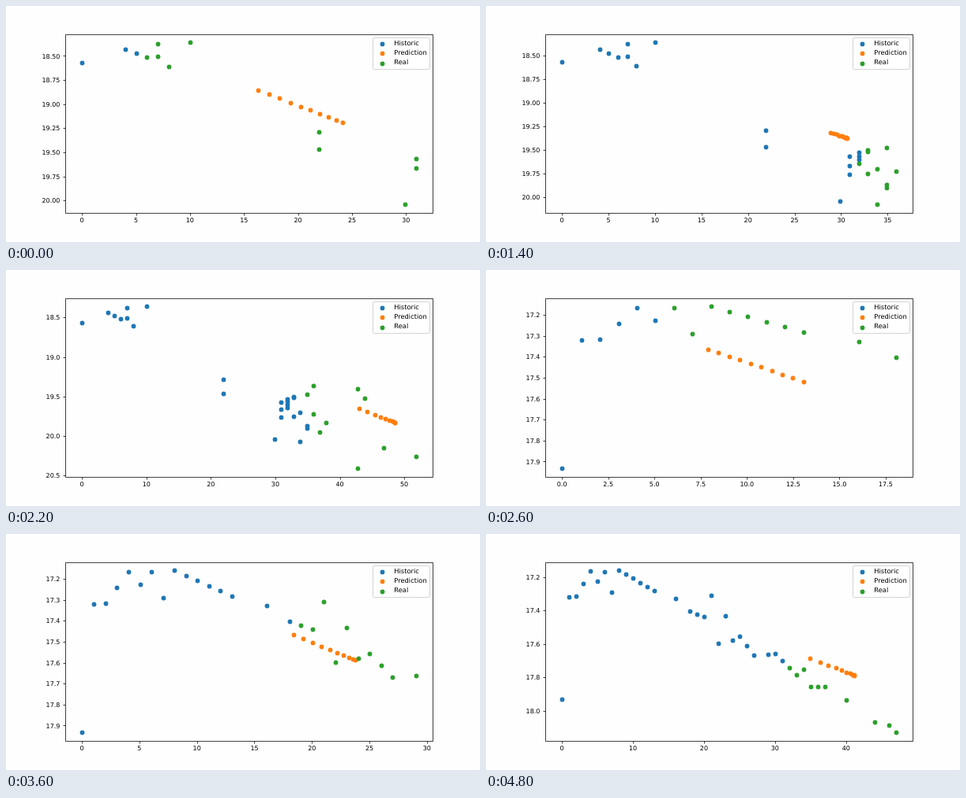
An HTML page for the animation above (5 s loop, 600x300 px).

```html
<!DOCTYPE html>
<html lang="en">
<head>
<meta charset="utf-8">
<title>Forecast scatter</title>
<style>
  html, body { margin: 0; width: 100%; height: 100%; overflow: hidden; background: #fefefe; }
  svg { display: block; width: 100%; height: 100%; }
  text { font: 8px "DejaVu Sans", sans-serif; text-rendering: geometricPrecision; }
  .legend text { font-size: 8.333px; }
</style>
</head>
<body>
<svg id="chart" viewBox="0 0 600 300"></svg>
<script>
const STEP = 200, COUNT = 25, AHEAD = 10;
const BOX = { l: 75, t: 36, r: 540, b: 262.5 };
const BLUE = '#1f77b4', ORANGE = '#ff7f0e', GREEN = '#2ca02c';

const lerp = (a, b, t) => a + (b - a) * t;
const range = (n, fn) => Array.from({ length: n }, (_, i) => fn(i));

// Key points [day, magnitude, n]: n evenly spaced observations lead up to each one
function observe(rate, keys) {
  return keys.flatMap(([day, mag, n = 1], j) => {
    const [day0, mag0] = keys[j - 1] || [day, mag];
    return range(n, q => {
      const t = (q + 1) / n, d = lerp(day0, day, t);
      return [d && d * rate + .07, lerp(mag0, mag, t)];
    });
  });
}

// Forecast keys: [step, first day, first magnitude, days covered, magnitude gained]
const phases = [{
  from: 0, known: 3, legend: 464.5,
  points: observe(.995, [
    [0, 18.57], [4, 18.435], [6, 18.515, 2], [7, 18.38], [7, 18.51], [8, 18.61], [10, 18.36],
    [22, 19.47], [22, 19.29], [30, 20.04], [31, 19.57], [31, 19.76, 2], [32, 19.53], [32, 19.64, 3],
    [33, 19.75], [33, 19.5], [33, 19.515], [34, 19.7], [34, 20.075], [35, 19.87], [35, 19.905],
    [35, 19.475], [36, 19.725], [36, 19.37], [37, 19.95], [38, 19.83], [43, 19.41], [43, 20.41],
    [44, 19.52], [47, 20.15], [52, 20.26]
  ]),
  forecasts: [
    [0, 16.29, 18.855, 7.84, .338], [3, 19.13, 18.969, 7.14, .265],
    [7, 28.86, 19.316, 1.78, .058], [11, 43, 19.652, 5.58, .179]
  ]
}, {
  from: 12, known: 4,
  points: observe(.999, [
    [0, 17.933], [1, 17.322], [2, 17.316], [4, 17.166, 2], [5, 17.228], [6, 17.168], [7, 17.292],
    [8, 17.16], [13, 17.283, 5], [16, 17.328], [18, 17.405], [20, 17.44, 2], [21, 17.312],
    [22, 17.6], [23, 17.435], [24, 17.58], [25, 17.557], [27, 17.669, 2], [29, 17.664], [30, 17.66],
    [33, 17.785, 3], [34, 17.752], [35, 17.855], [37, 17.858, 2], [40, 17.937], [44, 18.067],
    [46, 18.086], [47, 18.13]
  ]),
  forecasts: [
    [15, 12.11, 17.407, 5.24, .14], [18, 18.41, 17.469, 5.36, .12], [24, 35, 17.688, 6.22, .101]
  ]
}];

// Ten points on a line, bunching up toward its end more with every step
function forecast(keys, i) {
  const k = Math.max(1, keys.findIndex(key => key[0] >= i));
  const a = keys[k - 1], b = keys[k];
  const t = (i - a[0]) / (b[0] - a[0]);
  const [, day, mag, days, gain] = a.map((v, n) => lerp(v, b[n], t));
  const bend = 1.2 + .1 * (i - keys[0][0]);
  return range(AHEAD, n => {
    const s = 1 - (1 - n / (AHEAD - 1)) ** bend;
    return [day + days * s, mag + gain * s];
  });
}

// Axis with 5% margins and at most nine round intervals
function axis(values, from, to) {
  const lo = Math.min(...values), hi = Math.max(...values), pad = (hi - lo) * .05;
  const min = lo - pad, span = hi - lo + 2 * pad;
  const raw = span / 9, mag = 10 ** Math.floor(Math.log10(raw));
  const step = [1, 2, 2.5, 5, 10].find(m => m * mag >= raw) * mag;
  const digits = [0, 1, 2].find(d => Math.abs(step * 10 ** d - Math.round(step * 10 ** d)) < 1e-6);
  const start = Math.ceil(min / step), end = Math.floor((min + span) / step);
  return {
    pos: v => lerp(from, to, (v - min) / span),
    label: v => v.toFixed(digits),
    ticks: range(end - start + 1, n => (start + n) * step)
  };
}

// Strokes and dots sit on pixel centres
const line = v => Math.floor(v + .5) + .5;
const centre = v => Math.floor(v + .2) + .5;
const dot = (x, y, color) => `<circle cx="${centre(x)}" cy="${centre(y)}" r="2.9" fill="${color}"/>`;
const text = (x, y, s, anchor = 'start') => `<text x="${x.toFixed(2)}" y="${y.toFixed(2)}" text-anchor="${anchor}">${s}</text>`;

function legend(left) {
  const rows = [['Historic', BLUE], ['Prediction', ORANGE], ['Real', GREEN]];
  return `<g class="legend"><rect x="${left}" y="40.5" width="72" height="40" rx="1.7" fill="#fff" fill-opacity=".8" stroke="#ccc" stroke-width=".83"/>` +
    rows.map(([name, color], n) =>
      dot(left + 11.6, 48.4 + n * 12.25, color) + text(left + 26.8, 49.9 + n * 12.25, name)).join('') + '</g>';
}

function draw(i) {
  const phase = phases[i < phases[1].from ? 0 : 1];
  const known = phase.known + 2 * (i - phase.from);
  const shown = phase.points.slice(0, known + AHEAD);
  const ax = axis(shown.map(p => p[0]), BOX.l, BOX.r);
  const ay = axis(shown.map(p => p[1]), BOX.t, BOX.b);
  const dots = (list, color) => list.map(p => dot(ax.pos(p[0]), ay.pos(p[1]), color)).join('');
  const [l, t, r, b] = [BOX.l, BOX.t, BOX.r, BOX.b].map(line);

  let marks = '', labels = '';
  for (const v of ax.ticks) {
    const x = ax.pos(v);
    marks += `M${line(x)} ${b}v3`;
    labels += text(x, 274.6, ax.label(v), 'middle');
  }
  for (const v of ay.ticks) {
    const y = ay.pos(v);
    marks += `M${l} ${line(y)}h-3`;
    labels += text(68.4, y + 3.1, ay.label(v), 'end');
  }

  // The legend avoids the dots: top left when one would lie beneath it
  const covered = shown.some(p => ax.pos(p[0]) > 464 && ay.pos(p[1]) < 80);
  chart.innerHTML =
    dots(shown.slice(0, known), BLUE) +
    dots(forecast(phase.forecasts, i), ORANGE) +
    dots(shown.slice(known), GREEN) +
    `<path d="M${l} ${t}H${r}V${b}H${l}Z${marks}" fill="none" stroke="#000" stroke-width=".75"/>` +
    labels + legend(covered ? 79.5 : 464.5);
}

const chart = document.getElementById('chart');
const start = performance.now();
let last = -1;
function tick() {
  const i = Math.floor((performance.now() - start) / STEP) % COUNT;
  if (i !== last) draw(last = i);
  requestAnimationFrame(tick);
}
tick();
</script>
</body>
</html>
```
